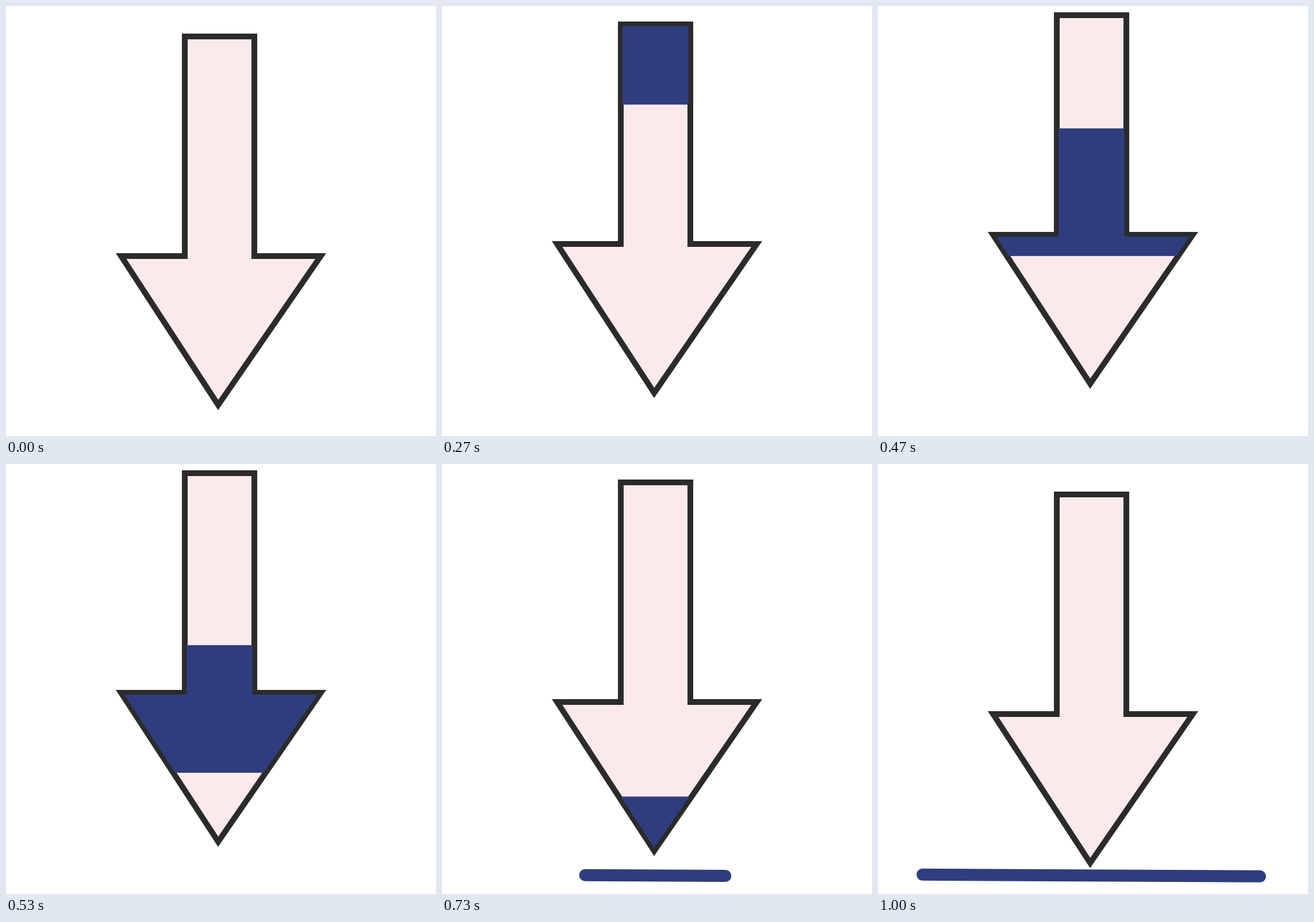
Write an HTML page that moves like this. It is 748 px wide and 748 px high and loops after 1.06 s.

```html
<!DOCTYPE html>
<html lang="en">
<head>
<meta charset="utf-8">
<title>Download arrow</title>
<style>
  html, body { margin: 0; width: 100%; height: 100%; overflow: hidden; background: #fff; }
  svg { display: block; width: 100%; height: 100%; }
</style>
</head>
<body>
<svg viewBox="0 0 748 748">
  <defs>
    <clipPath id="inside">
      <path d="M314 56H428.7V438H541.8L369.1 688.6 205.7 438H314Z"/>
    </clipPath>
  </defs>
  <line id="ground" stroke="#2f3d7e" stroke-width="21" stroke-linecap="round"/>
  <g id="arrow">
    <path d="M311 53H432V435H547.5L369.1 694 200.2 435H311Z"
          fill="#faeaeb" stroke="#2b2b2a" stroke-width="10"/>
    <g clip-path="url(#inside)">
      <rect id="band" x="190" width="370" height="222" fill="#2f3d7e"/>
    </g>
  </g>
</svg>
<script>
const LOOP = 1060;
const LAST_STEP = 30;
const [ground, arrow, band] = ['ground', 'arrow', 'band'].map(id => document.getElementById(id));

function setAttrs(node, attrs) {
  for (const name in attrs) node.setAttribute(name, attrs[name]);
}

// cubic-bezier(.42, 0, .58, 1), solved by bisection
function easeInOut(x) {
  if (x <= 0) return 0;
  if (x >= 1) return 1;
  let low = 0, high = 1, s = 0.5;
  for (let i = 0; i < 24; i++) {
    s = (low + high) / 2;
    const guess = 1.26 * s * (1 - s) ** 2 + 1.74 * s * s * (1 - s) + s ** 3;
    if (guess < x) low = s; else high = s;
  }
  return s * s * (3 - 2 * s);
}

// 30 steps per second, each starting on a whole 10 ms tick
function stepAt(ms) {
  const tick = Math.floor(ms / 10) * 10;
  return Math.min(LAST_STEP, Math.floor((tick + 4) * 0.03));
}

function draw(ms) {
  const step = stepAt(ms);

  const lift = easeInOut(1 - Math.abs(step - 15) / 15);
  const shift = Math.round(0.4 - 38 * lift);
  setAttrs(arrow, { transform: `translate(0 ${shift})` });

  const bandTop = -182 + 892 * easeInOut(step / LAST_STEP);
  setAttrs(band, { y: bandTop - shift });

  const spread = easeInOut((step - 17.9) / 9.1);
  const dx = 293.5 * spread, dy = 1.5 * spread;
  setAttrs(ground, {
    x1: 371 - dx, y1: 715.8 - dy,
    x2: 371 + dx, y2: 715.8 + dy,
    visibility: step > 18 ? 'visible' : 'hidden'
  });
}

const start = performance.now();
function tick() {
  draw((performance.now() - start) % LOOP);
  requestAnimationFrame(tick);
}
tick();
</script>
</body>
</html>
```
